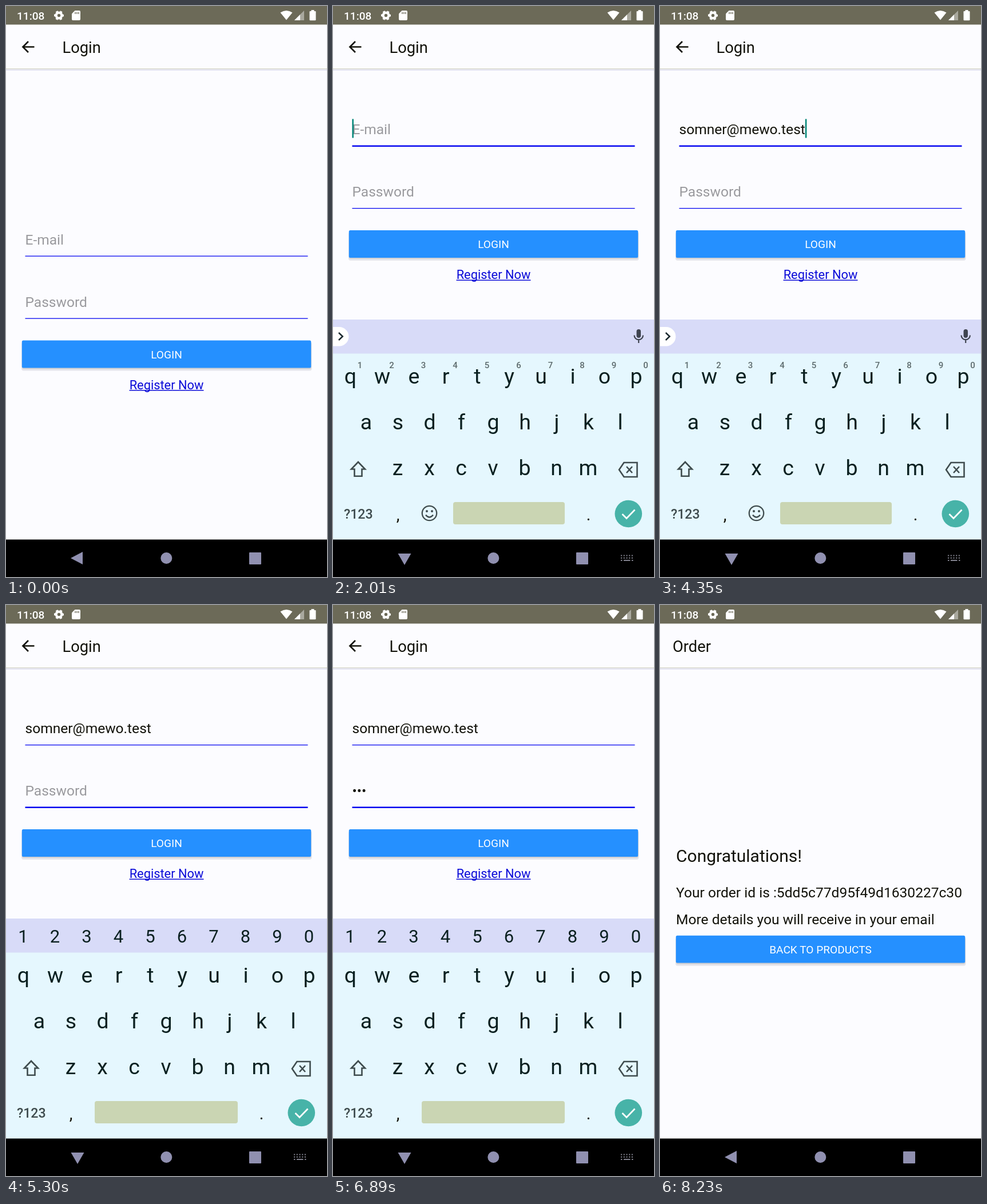
An HTML page that plays this animation: 561 px wide and 998 px high, repeating every 8250 ms.

```html
<!DOCTYPE html>
<html lang="en">
<head>
<meta charset="utf-8">
<title>Login and order</title>
<style>
html, body { margin: 0; width: 100%; height: 100%; overflow: hidden; background: #fcfcff; }
svg { display: block; width: 561px; height: 998px; }
text { font-family: Roboto, sans-serif; fill: #12120a; white-space: pre; }
.mid { text-anchor: middle; }
.white { fill: #fff; }
.hint { fill: #9a9a9e; }
.key { font-size: 37.5px; fill: #0a2020; }
.num { font-size: 31px; fill: #0a2020; }
.sup { font-size: 15px; font-weight: 500; fill: #5c6a6c; }
.icon { fill: none; stroke: #3f4c4e; stroke-width: 2.6; }
</style>
</head>
<body>
<svg id="stage" viewBox="0 0 561 998"></svg>
<script>
const LOOP = 8250;
const EMAIL = "somner@mewo.test";
const SHIFT = -192.5;

const FOCUS_EMAIL = 850, FOCUS_PASS = 4760;
const KB_IN = [1720, 1860], KB_OUT = [7540, 7610];
const FORM_UP = [1760, 7590];
const ORDER_IN = [7760, 8200];

// Key times: name part, domain part, password
const run = (n, start, gap) => Array.from({ length: n }, (_, i) => start + i * gap);
const emailKeys = [...run(7, 2070, 130), ...run(9, 3060, 130)];
const passKeys = run(3, 5750, 200);

const text = (x, y, size, str, extra = "") =>
  `<text x="${x}" y="${y}" font-size="${size}" ${extra}>${str}</text>`;
const rect = (x, y, w, h, fill, extra = "") =>
  `<rect x="${x}" y="${y}" width="${w}" height="${h}" fill="${fill}" ${extra}/>`;
const path = (d, extra = "") => `<path d="${d}" ${extra}/>`;
const row = (chars, x, y, cls) => [...chars].map((c, i) =>
  `<text x="${x + 55.5 * i}" y="${y}" class="mid ${cls}">${c}</text>`).join("");

const header = (title, x) =>
  rect(0, 32, 561, 78, "#fcfcff") + rect(0, 109, 561, 1.6, "#d8d8cc") +
  rect(0, 110.6, 561, 2.2, "#e3e3f2") + text(x, 82, 27.3, title);

const button = (y, label) =>
  rect(27, y + 3, 507.5, 50, "#e6e6ec", 'rx="4"') +
  rect(28, y + 2, 505.5, 48, "#d0d0d2", 'rx="3"') +
  rect(27.8, y, 505.4, 47.8, "#2590ff", 'rx="2.5"') +
  text(280.5, y + 31, 19.1, label, 'class="mid white"');

const statusBar = rect(0, 0, 561, 32.5, "#6c6a58") +
  text(19, 23.5, 19.1, "11:08", 'class="white" font-weight="500"') +
  `<g fill="none" stroke="#fff"><circle cx="92.5" cy="16.5" r="4.8" stroke-width="4.2"/>
   <circle cx="92.5" cy="16.5" r="7.4" stroke-width="2.2" stroke-dasharray="4 3.75" stroke-dashoffset="2"/></g>` +
  path("M120.500 8h7.500q2 0 2 2v13q0 2-2 2h-11q-2 0-2-2v-9.500z", 'fill="#fff"') +
  path("M121 10.500v3.500M124 10.500v3.500M127 10.500v3.500", 'stroke="#6c6a58" stroke-width="1.4"') +
  path("M479.500 11.500Q490 4.500 500.500 11.500L490 24.500z", 'fill="#fff"') +
  path("M521 8v17h-17z", 'fill="#a9a89e"') + path("M514 15v10h-10z", 'fill="#fff"') +
  path("M533.500 9v-2h5v2h2q1 0 1 1v14q0 1.300-1.300 1.300h-8.400q-1.300 0-1.300-1.300v-14q0-1 1-1z", 'fill="#fff"');

const navBar = rect(0, 932.5, 561, 65.5, "#000") +
  `<g fill="#9090b0">
    ${path("M113 965L134 954V976z", 'id="back"')}
    ${path("M113.500 957H136.500L125 977z", 'id="down"')}
    <circle cx="280.300" cy="965" r="10"/>
    ${rect(425, 955, 21, 21, "#9090b0", 'rx="1"')}
  </g>
  <g id="imeIcon" stroke="#80808c" stroke-width="2">
    ${path("M503 960.500H524.500M503 964.700H524.500", 'stroke-dasharray="2.200 2.500"')}
    ${path("M503 969H505.500M508 969H519.500M522 969H524.500")}
  </g>`;

const login = header("Login", 98.5) +
  path("M49.500 71.500H30M39 62L29.500 71.500L39 81", 'fill="none" stroke="#12120a" stroke-width="2.7"') +
  `<g id="form">
    <rect id="line0" x="33.500" width="494" fill="#0808f0"/>
    <rect id="line1" x="33.500" width="494" fill="#0808f0"/>
    ${text(33.5, 416.5, 24.55, "", 'id="field0"')}
    ${text(33.5, 525.5, 24.55, "", 'id="field1"')}
    <rect id="caret" width="2.500" height="33" fill="#008577"/>
    ${button(584.6, "LOGIN")}
    ${text(280.5, 669.5, 21.8, "Register Now", 'class="mid" style="fill:#0a0ad8"')}
    ${rect(215.5, 671, 130, 1.5, "#0a0ad8")}
  </g>`;

const keyboard = rect(0, 548, 561, 385, "#e5f7fe") + rect(0, 548, 561, 59.5, "#d8dbf8") +
  `<g id="mailKeys">
    ${rect(-20, 561, 47.5, 33.5, "#fff", 'rx="16.700"')}
    ${path("M10 571L16.800 577.500L10 584", 'fill="none" stroke="#1c2a30" stroke-width="2.5"')}
    ${rect(530.5, 565, 7.5, 15, "#3f4450", 'rx="3.700"')}
    ${path("M526.500 575.500a7.700 7.700 0 0 0 15.400 0M534.200 583v6", 'fill="none" stroke="#3f4450" stroke-width="2.2"')}
    ${row("1234567890", 47, 632.5, "sup")}
    <g class="icon" style="stroke-width:2.300"><circle cx="168.500" cy="886.500" r="12.700"/>
    ${path("M162 889.500q6.500 8 13 0")}</g>
    <g fill="#3f4c4e"><circle cx="164" cy="883" r="2"/><circle cx="173" cy="883" r="2"/></g>
  </g>
  <g id="passKeys">${row("1234567890", 30, 590, "num")}</g>` +
  row("qwertyuiop", 30.5, 660, "key") + row("asdfghjkl", 58, 740, "key") +
  row("zxcvbnm", 113, 820, "key") +
  path("M44 797L32 809.500H37.500V821.700H50.500V809.500H56z", 'class="icon"') +
  path("M508.500 798H531.500V823H508.500L500 810.500zM513 805L523 816M523 805L513 816", 'class="icon"') +
  text(44.3, 895.5, 23.2, "?123", 'class="mid" font-weight="500" style="fill:#3f4c4e"') +
  text(113.5, 899, 29, ",", 'class="mid"') + text(446.5, 899, 29, ".", 'class="mid"') +
  `<rect id="space" y="867" height="39" rx="4" fill="#cad5b3"/>
  <circle cx="516.300" cy="887.500" r="23.800" fill="#47b3a8"/>
  ${path("M505.500 888L513 895.500L527.500 880.500", 'fill="none" stroke="#fff" stroke-width="2.7"')}`;

const order = rect(0, 32, 561, 901, "#fcfcff") + header("Order", 22) +
  text(28, 449, 30, "Congratulations!") +
  text(28, 510.5, 24.55, "Your order id is :5dd5c77d95f49d1630227c30") +
  text(28, 557.5, 24.55, "More details you will receive in your email") +
  button(577.8, "BACK TO PRODUCTS");

const $ = id => document.getElementById(id);
$("stage").innerHTML = rect(0, 0, 561, 998, "#fcfcff") + login +
  `<g id="kb">${keyboard}</g><g id="order">${order}</g>` + statusBar + navBar;

const set = (id, attrs) => {
  for (const k in attrs) $(id).setAttribute(k, attrs[k]);
};
const show = (id, on) => set(id, { visibility: on ? "visible" : "hidden" });
const part = (t, [a, b]) => Math.min(1, Math.max(0, (t - a) / (b - a)));
const typed = (keys, t) => keys.filter(k => k <= t);

function field(i, value, hint) {
  const el = $("field" + i), str = value || hint;
  if (el.textContent !== str) el.textContent = str;
  el.setAttribute("class", value ? "" : "hint");
  return value ? el.getComputedTextLength() : 0;
}

function draw(t) {
  const focus = t >= FOCUS_PASS ? 1 : t >= FOCUS_EMAIL ? 0 : -1;
  const mail = typed(emailKeys, t), pass = typed(passKeys, t);
  const widths = [
    field(0, EMAIL.slice(0, mail.length), "E-mail"),
    field(1, "•".repeat(pass.length), "Password")
  ];
  for (const i of [0, 1]) {
    const on = focus === i;
    set("line" + i, { y: 436.5 + 109 * i - (on ? 0.5 : 0), height: on ? 2.5 : 1.3 });
  }

  const last = focus === 1 ? Math.max(FOCUS_PASS, ...pass) : Math.max(FOCUS_EMAIL, ...mail);
  show("caret", focus >= 0 && (t - last) % 1000 < 500);
  if (focus >= 0) set("caret", { x: 33.5 + widths[focus], y: 390 + 109 * focus });

  const up = t >= FORM_UP[0] && t < FORM_UP[1];
  set("form", { transform: `translate(0 ${up ? SHIFT : 0})` });

  const rise = 1 - (1 - part(t, KB_IN)) ** 2, fall = part(t, KB_OUT) ** 2;
  const open = t >= KB_IN[0] && t < KB_OUT[0], secret = focus === 1;
  set("kb", {
    transform: `translate(0 ${385 * (1 - rise + fall)})`,
    display: t >= KB_IN[0] && fall < 1 ? "inline" : "none"
  });
  show("mailKeys", !secret);
  show("passKeys", secret);
  set("space", { x: secret ? 155 : 210, width: secret ? 250 : 195 });
  show("back", !open);
  show("down", open);
  show("imeIcon", open);

  const p = 1 - (1 - part(t, ORDER_IN)) ** 3;
  set("order", {
    transform: `translate(0 ${72 * (1 - p)})`,
    opacity: p,
    display: p > 0 ? "inline" : "none"
  });
}

const start = performance.now();
function tick() {
  draw((performance.now() - start) % LOOP);
  requestAnimationFrame(tick);
}
tick();
</script>
</body>
</html>
```
